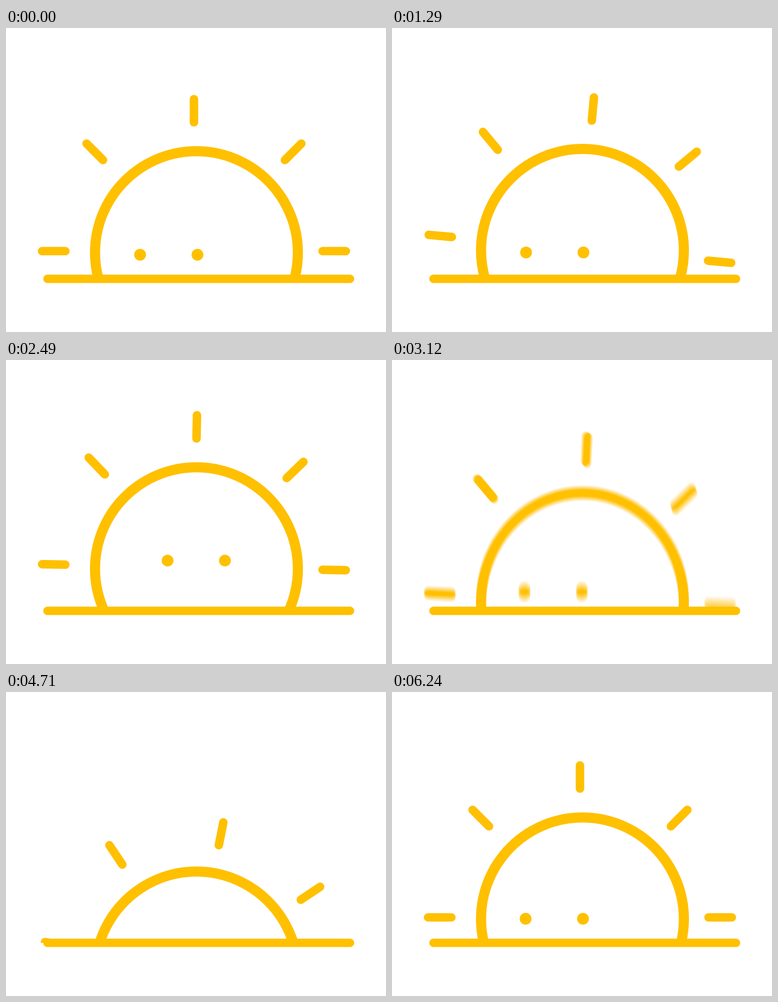
An HTML page with a canvas for the animation above (6330 ms loop, 837x669 px).

```html
<!DOCTYPE html>
<html lang="en">
<head>
<meta charset="utf-8">
<title>Sunrise</title>
<style>
  html, body { margin: 0; width: 100%; height: 100%; overflow: hidden; background: #fff; }
  canvas { display: block; width: 837px; height: 669px; }
</style>
</head>
<body>
<canvas id="stage" width="837" height="669"></canvas>
<script>
const W = 837, H = 669, LOOP = 6330, STEP = 30, LAST = 6240;
const YELLOW = '#ffc000';
const CX = 414, HORIZON = 552;
const SHUTTER = 26, SAMPLES = 12;

const stage = document.getElementById('stage').getContext('2d');
const layerCanvas = document.createElement('canvas');
layerCanvas.width = W;
layerCanvas.height = H;
const layer = layerCanvas.getContext('2d');

// 0 before the start, 1 after the end, half a cosine between.
function ease(t, start, end) {
  const u = Math.min(1, Math.max(0, (t - start) / (end - start)));
  return (1 - Math.cos(Math.PI * u)) / 2;
}

function pulse(t, start, peak, end) {
  return ease(t, start, peak) - ease(t, peak, end);
}

// Peek up, crouch, drop low, climb slowly, pop back up.
function sunY(t) {
  return 491 - 5 * ease(t, 0, 900) - 30 * ease(t, 1330, 1980) - 12 * ease(t, 2640, 2965)
    + 195 * ease(t, 2965, 3300) - 24 * ease(t, 3960, 4560)
    - 7 * ease(t, 4990, 5550) - 112 * ease(t, 5960, 6230);
}

// Quick small sway while high, slow wide sway while low.
function tilt(t) {
  const quick = t < 1109 ? 10 * ease(t, 0, 1109) : 10 * Math.cos(2 * Math.PI * (t - 1109) / 1121);
  const reach = (18.2 - 10 * ease(t, 4500, 5500)) * (1 - ease(t, 5550, 5960));
  const wide = reach * Math.cos(Math.PI * (t - 4480) / 838);
  const mix = ease(t, 3250, 3650);
  return quick * (1 - mix) + wide * mix;
}

function gaze(t) {
  const right = ease(t, 1320, 1750), back = ease(t, 2300, 2650), reset = ease(t, 3400, 5900);
  return {
    x: -55.5 + 144.5 * right - 148 * back + 2.5 * reset,
    y: 8 - 17.5 * right - 9 * back + 21.5 * reset
  };
}

function line(c, x0, y0, x1, y1) {
  c.beginPath();
  c.moveTo(x0, y0);
  c.lineTo(x1, y1);
  c.stroke();
}

function circle(c, x, y, r) {
  c.beginPath();
  c.arc(x, y, r, 0, Math.PI * 2);
}

function drawSun(c, t) {
  c.save();
  c.beginPath();
  c.rect(0, 0, W, HORIZON);
  c.clip();
  c.translate(CX, sunY(t));
  c.scale(1 + 0.177 * pulse(t, 5980, 6110, 6225), 1 + 0.16 * pulse(t, 3060, 3180, 3300));
  c.strokeStyle = c.fillStyle = YELLOW;

  c.lineWidth = 22.3;
  circle(c, 5.5, 3.5, 223.4);
  c.stroke();

  const look = gaze(t);
  for (const side of [-1, 1]) {
    circle(c, look.x + side * 63.2, look.y, 13);
    c.fill();
  }

  c.lineCap = 'round';
  c.lineWidth = 18.7;
  c.rotate(tilt(t) * Math.PI / 180);
  for (let i = 0; i < 5; i++) {
    line(c, -283.3, 0, -334.5, 0);
    c.rotate(Math.PI / 4);
  }
  c.restore();
}

function render(t) {
  // Fast moves average several moments of a short exposure.
  const fast = (t > 2990 && t < 3300) || (t > 5970 && t < 6230);
  const samples = fast ? SAMPLES : 1;
  for (let i = 0; i < samples; i++) {
    layer.fillStyle = '#fff';
    layer.fillRect(0, 0, W, H);
    drawSun(layer, fast ? t + SHUTTER * ((i + 0.5) / samples - 0.5) : t);
    stage.globalAlpha = 1 / (i + 1);
    stage.drawImage(layerCanvas, 0, 0);
  }
  stage.globalAlpha = 1;
  stage.strokeStyle = YELLOW;
  stage.lineCap = 'round';
  stage.lineWidth = 18.4;
  line(stage, 91.2, HORIZON, 757.8, HORIZON);
}

let shown = -1;
const start = performance.now();

function tick() {
  const now = Math.max(0, performance.now() - start) % LOOP;
  const t = Math.min(LAST, Math.floor(now / STEP) * STEP);
  if (t !== shown) render(shown = t);
  requestAnimationFrame(tick);
}
tick();
</script>
</body>
</html>
```
